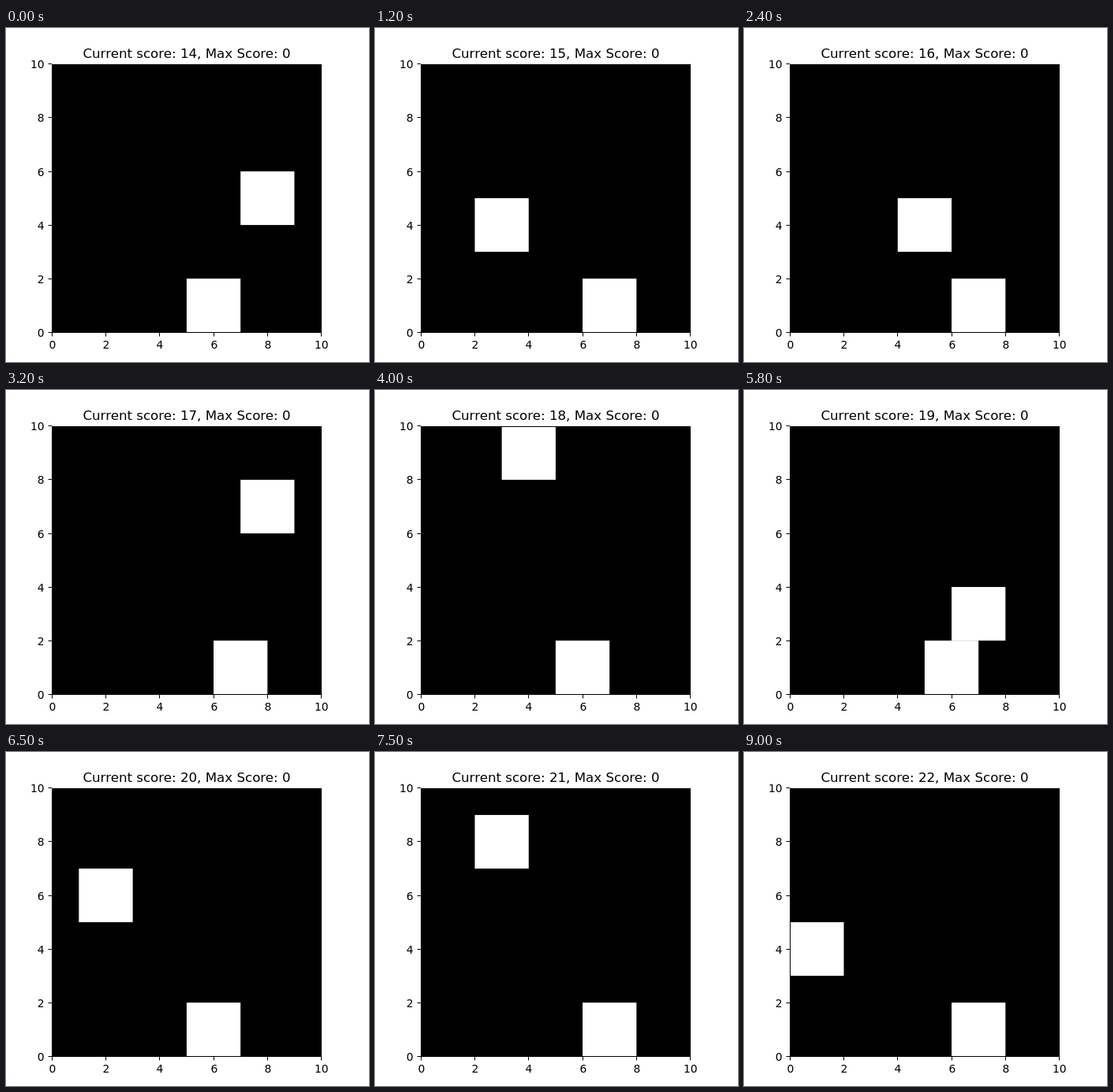
These frames come from a looping animation (460 px wide and 424 px high, 9100 ms). An HTML page with a canvas:

```html
<!DOCTYPE html>
<html lang="en">
<head>
<meta charset="utf-8">
<title>Falling block</title>
<style>
  html, body { margin: 0; width: 100%; height: 100%; overflow: hidden; background: #fff; }
  canvas { display: block; }
</style>
</head>
<body>
<canvas id="stage" width="460" height="424"></canvas>
<script>
const ctx = document.getElementById('stage').getContext('2d');
const LOOP = 9100, TICK = 100;
const LEFT = 58.2, RIGHT = 399.6, TOP = 45.9, BOTTOM = 386.2;
const FONT = '"DejaVu Sans", Verdana, sans-serif';

// Ticks on which the game stalls, and one on which it catches up.
const STALLS = [6, 7, 17, 23, 29, 44, 58, 66, 71, 81];
const CATCH_UP = 8;
// Column of the block and of the paddle in each round.
const BLOCKS = [7, 2, 4, 7, 3, 6, 1, 2, 0];
const PADDLES = [5, 6, 6, 6, 5, 5, 5, 6, 6];

const px = x => LEFT + (RIGHT - LEFT) * x / 10;
const py = y => BOTTOM - (BOTTOM - TOP) * y / 10;

function stateAt(ms) {
  const tick = Math.floor(ms / TICK);
  const stalled = STALLS.filter(s => s <= tick).length;
  const step = 4 + tick - stalled + (tick >= CATCH_UP ? 1 : 0);
  const round = Math.floor(step / 10);
  return { row: 8 - step % 10, block: BLOCKS[round], paddle: PADDLES[round], score: 14 + round };
}

function square(x, y) {
  const bottom = Math.max(y, 0);
  ctx.fillRect(px(x), py(y + 2), px(x + 2) - px(x), py(bottom) - py(y + 2));
}

function line(x1, y1, x2, y2) {
  ctx.beginPath();
  ctx.moveTo(x1, y1);
  ctx.lineTo(x2, y2);
  ctx.stroke();
}

function drawAxes() {
  ctx.strokeStyle = ctx.fillStyle = '#000';
  ctx.lineWidth = 1;
  ctx.strokeRect(58.5, 46.5, 341, 340);
  ctx.font = '13.89px ' + FONT;
  for (let v = 0; v <= 10; v += 2) {
    const x = Math.floor(px(v)) + 0.5, y = Math.floor(py(v)) + 0.5;
    line(x, 387, x, 391.5);
    line(53.5, y, 58, y);
    ctx.textAlign = 'center';
    ctx.fillText(v, x + 0.3, 407);
    ctx.textAlign = 'right';
    ctx.fillText(v, 48.6, y + 5);
  }
}

function draw(ms) {
  const s = stateAt(ms);
  ctx.fillStyle = '#fff';
  ctx.fillRect(0, 0, 460, 424);
  ctx.fillStyle = '#000';
  ctx.fillRect(58, 46, 342, 341);
  ctx.fillStyle = '#fff';
  square(s.block, s.row);
  square(s.paddle, 0);
  drawAxes();
  ctx.font = '16.67px ' + FONT;
  ctx.textAlign = 'center';
  ctx.fillText(`Current score: ${s.score}, Max Score: 0`, 229, 38);
}

const start = performance.now();
function loop() {
  draw((performance.now() - start) % LOOP);
  requestAnimationFrame(loop);
}
loop();
</script>
</body>
</html>
```
